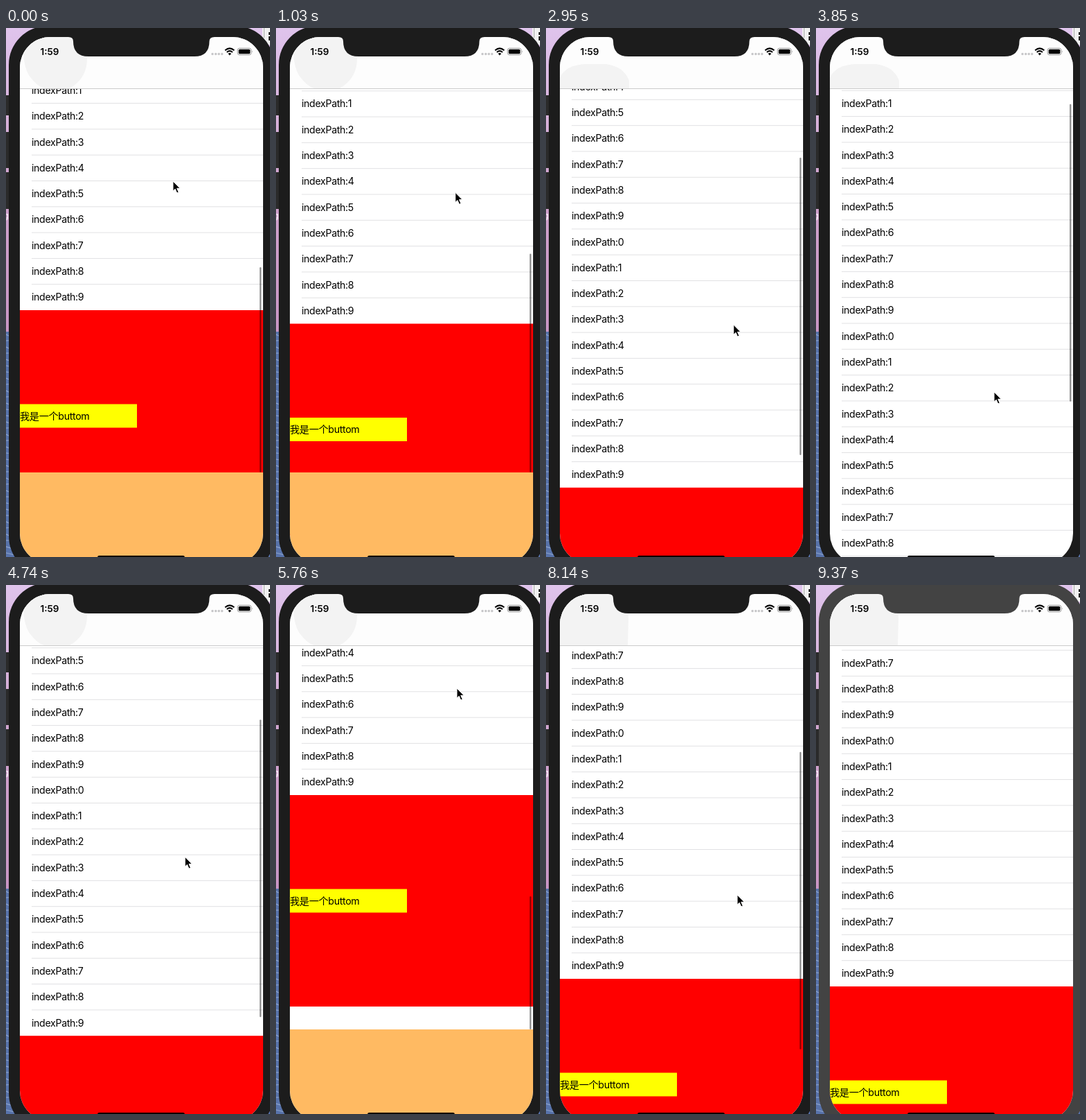
An HTML page for the animation above (9.47 s loop, 381x763 px).

```html
<!DOCTYPE html>
<html lang="zh">
<head>
<meta charset="utf-8">
<title>Nested scrolling list</title>
<style>
html, body { margin: 0; width: 100%; height: 100%; overflow: hidden; background: #d9b9df; }
svg { display: block; width: 381px; height: 763px; }
text { font-family: Inter, "Noto Sans CJK SC", "Noto Sans CJK", sans-serif; }
.label { font-size: 14.2px; letter-spacing: -.35px; fill: #000; }
.time { font-size: 13.5px; font-weight: 600; }
</style>
</head>
<body>
<svg viewBox="0 0 381 763" xmlns="http://www.w3.org/2000/svg">
  <defs>
    <linearGradient id="sky" x1="0" y1="0" x2="0" y2="1">
      <stop offset="0" stop-color="#dfc4ec"/>
      <stop offset=".5" stop-color="#cfa3cd"/>
      <stop offset="1" stop-color="#c795c4"/>
    </linearGradient>
    <clipPath id="screen"><rect x="20" y="13" width="351" height="760" rx="44"/></clipPath>
    <clipPath id="page"><rect x="20" y="87" width="351" height="676"/></clipPath>
  </defs>

  <rect width="381" height="438" fill="url(#sky)"/>
  <rect y="438" width="381" height="325" fill="#5873ab"/>
  <g id="waves" stroke="#8ea5cf" stroke-width="1.2"></g>
  <rect x="370" width="11" height="24" fill="#f1f1f1"/>
  <path d="M372.5 0V14" stroke="#aaa"/>
  <path d="M379 6h2v4h-2zM379 12h2v6h-2z" fill="#222"/>
  <text x="-3" y="275" font-size="11" fill="#fff">g</text>
  <path d="M0 97h5v29H0zM0 150h5v52H0zM0 208h5v53H0z" fill="#2a2a2a"/>
  <rect class="body" x="4" y="-3" width="383" height="792" rx="56"/>

  <g clip-path="url(#screen)">
    <rect x="20" y="13" width="351" height="760" fill="#fff"/>
    <g clip-path="url(#page)">
      <g id="list">
        <rect x="20" y="0" width="351" height="305" fill="#f00"/>
        <rect x="20" y="135.5" width="169" height="34" fill="#ff0"/>
        <text class="label" x="20" y="157.7">我是一个buttom</text>
      </g>
      <rect id="base" x="20" width="351" height="200" fill="#ffba62"/>
      <rect id="bar" x="366" width="2.4" rx="1.2" fill="#000"/>
    </g>
    <rect x="20" y="13" width="351" height="74" fill="#fdfdfd"/>
    <path id="tint" fill="#f3f3f3"/>
    <path d="M20 87.5H371" stroke="#cbcbcb"/>
    <rect x="132" y="761" width="126" height="5" rx="2.5"/>
  </g>

  <path class="body" d="M90 12V13Q97 13 97 19Q97 41 119 41H272Q293.500 41 293.500 19Q293.500 13 301 13V12Z"/>
  <text class="time" x="49.500" y="39">1:59</text>
  <g fill="#c6c6c8">
    <circle cx="298" cy="37.500" r="1.700"/><circle cx="302.700" cy="37.500" r="1.700"/>
    <circle cx="307.200" cy="37.500" r="1.700"/><circle cx="311.700" cy="37.500" r="1.700"/>
  </g>
  <g fill="none" stroke="#000" stroke-width="2">
    <path d="M316.200 32.200Q322.800 26.600 329.400 32.200M318.700 34.900Q322.800 31.400 326.900 34.900"/>
  </g>
  <path d="M320.500 37Q322.800 35.200 325.100 37L322.800 39.500Z"/>
  <rect x="334.200" y="29.200" width="19.600" height="9.600" rx="2.700" fill="none" stroke="#9a9a9a"/>
  <rect x="335.700" y="30.700" width="16.600" height="6.600" rx="1.500"/>
  <path d="M355 32.500q1.600 1.500 0 3z" fill="#9a9a9a"/>

  <path id="cursor" d="M0 0V14.200L3.200 11.200L5.700 17L8.200 15.900L5.700 10.300H10.200Z"
        stroke="#fff" stroke-width="1" stroke-linejoin="round"/>
</svg>
<script>
const LOOP = 9470, ROW = 37.3, KNEE = 437, REST = 641, THUMB = 429;
const $ = id => document.getElementById(id);
const bodies = document.querySelectorAll('.body');

function add(parent, tag, attrs, text) {
  const el = document.createElementNS('http://www.w3.org/2000/svg', tag);
  for (const k in attrs) el.setAttribute(k, attrs[k]);
  if (text) el.textContent = text;
  parent.appendChild(el);
}

// Rows stack upwards from the top of the red footer.
for (let i = 0; i < 20; i++) {
  const bottom = -i * ROW;
  add($('list'), 'text', { class: 'label', x: 37, y: bottom - ROW / 2 + 5 }, 'indexPath:' + (9 - i % 10));
  if (i) add($('list'), 'path', { d: `M37 ${bottom}H371`, stroke: '#e1e1e3' });
}
for (let y = 442; y < 763; y += 9)
  add($('waves'), 'path', { d: `M0 ${y}L14 ${y + 3 + 4 * Math.sin(y)}` });

// Refresh bursts: first change, last change, count.
const bursts = [
  [150, 1180, 8], [1320, 2210, 7], [2500, 3400, 7], [3550, 4000, 4], [4290, 5320, 8],
  [5470, 6510, 8], [6660, 7700, 8], [7850, 8290, 4], [8590, 8890, 3]
];
const ticks = [0];
for (const [a, b, n] of bursts)
  for (let i = 0; i < n; i++) ticks.push(Math.floor((a + (b - a) * i / (n - 1)) / 10) * 10);
ticks.push(9370);

// Time, footer top, cursor x, cursor y.
const keys = [
  [0, 407, 241, 221], [450, 384, 246, 199], [1180, 443, 262, 252], [1910, 557, 275, 351],
  [2210, 588, 276, 374], [2360, 588, 276, 374], [3400, 745, 264, 487], [3850, 799, 257, 525],
  [4000, 811, 256, 534], [4150, 811, 256, 534], [4290, 790, 256, 515], [5320, 425, 262, 215],
  [5760, 303, 261, 149], [5920, 297, 260, 145], [6510, 405, 258, 265], [6810, 438, 258, 303],
  [7700, 528, 270, 405], [8140, 568, 276, 447], [8290, 579, 276, 459], [8440, 579, 276, 459],
  [8590, 579, 288, 560], [8740, 579, 318, 680], [8890, 579, 350, 790], [9470, 579, 350, 790]
];

const slope = (i, c) => (keys[i + 1][c] - keys[i][c]) / (keys[i + 1][0] - keys[i][0]);

function tangent(i, c) {
  if (i === 0) return slope(0, c);
  if (i === keys.length - 1) return 0;
  const a = slope(i - 1, c), b = slope(i, c);
  return a * b > 0 ? 2 * a * b / (a + b) : 0;
}

// Monotone cubic interpolation of one column.
function sample(t, c) {
  let i = 0;
  while (i < keys.length - 2 && keys[i + 1][0] <= t) i++;
  const p = keys[i], q = keys[i + 1], h = q[0] - p[0], u = (t - p[0]) / h, v = 1 - u;
  return p[c] * v * v * (1 + 2 * u) + q[c] * u * u * (3 - 2 * u)
    + h * u * v * (v * tangent(i, c) - u * tangent(i + 1, c));
}

const disc = 'M26 13Q22 56 36 72Q45 84 55 87H92Q118 72 117 42L115 13Z';
const dome = 'M20 87V72Q28 53 58 52H86Q112 55 120 76V87Z';
const slab = 'M20 13H115L119 48L118 87H20Z';
const tintAt = t => t < 2500 ? disc : t < 4290 ? dome : t < 6660 ? disc : slab;

function draw(now) {
  const t = ticks.filter(k => k <= now).pop();
  const top = sample(t, 1);
  const edge = REST + Math.max(0, top - KNEE);
  const bar = top < KNEE ? 752 - top : 562.8 - .567 * top;
  $('list').setAttribute('transform', `translate(0 ${top.toFixed(1)})`);
  $('base').setAttribute('y', edge);
  $('bar').setAttribute('y', bar);
  $('bar').setAttribute('height', Math.min(bar + THUMB, edge) - bar);
  $('bar').setAttribute('opacity', .42 * Math.min(1, Math.max(0, (8890 - t) / 450)));
  $('tint').setAttribute('d', tintAt(t));
  $('cursor').setAttribute('transform', `translate(${sample(t, 2).toFixed(1)} ${sample(t, 3).toFixed(1)})`);
  for (const b of bodies) b.setAttribute('fill', t >= 9370 ? '#434343' : '#1c1c1c');
}

const start = performance.now();
function tick() {
  draw((performance.now() - start) % LOOP);
  requestAnimationFrame(tick);
}
tick();
</script>
</body>
</html>
```
